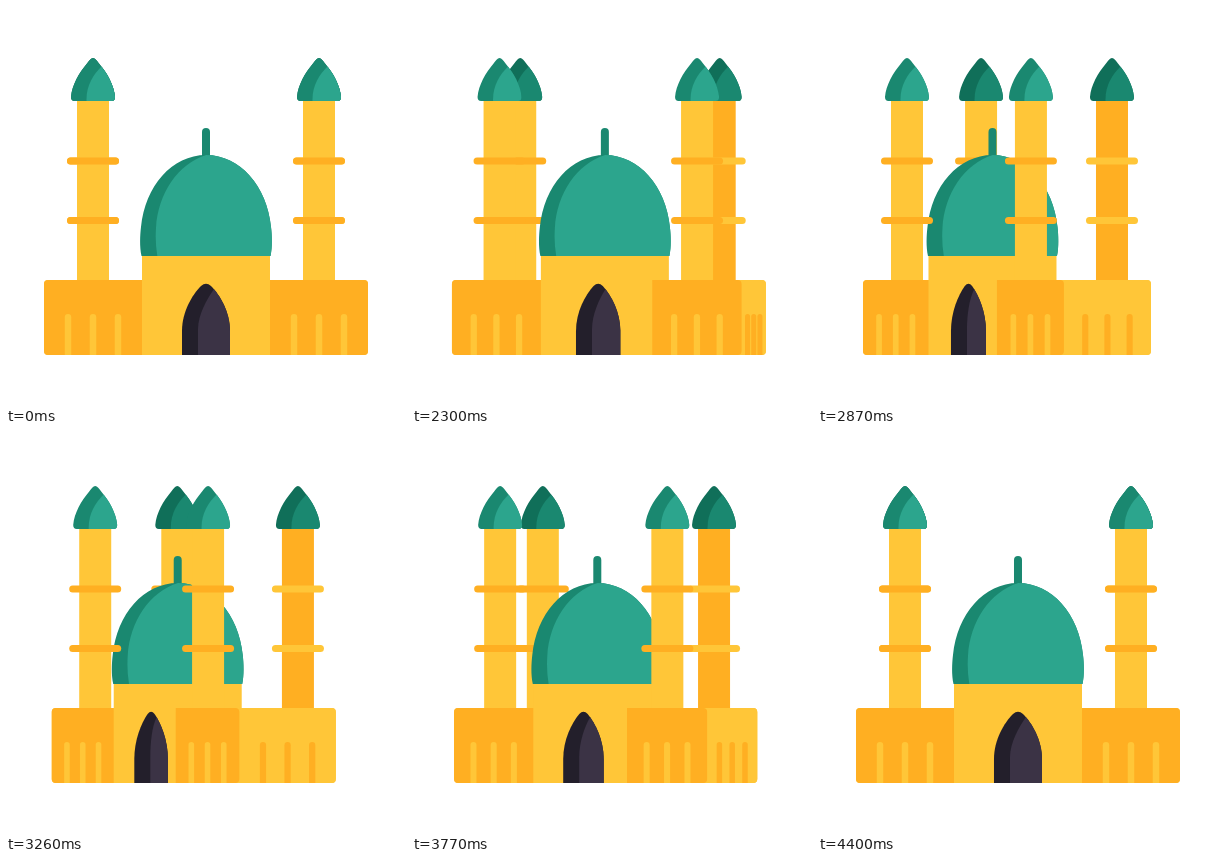
An HTML page that plays this animation: 400x400 px, repeating every 4.43 s.

```html
<!DOCTYPE html>
<html lang="en">
<head>
<meta charset="utf-8">
<title>Turning mosque</title>
<style>
  html, body { margin: 0; width: 100%; height: 100%; overflow: hidden; background: #fff; }
  svg { display: block; width: 100%; height: 100%; }
  .gold { fill: #ffc638; }
  .amber { fill: #ffaf22; }
  .teal { fill: #2ca58d; }
  .pine { fill: #1a8870; }
  .forest { fill: #106f59; }
</style>
</head>
<body>
<svg viewBox="0 0 400 400">
  <defs>
    <path id="cap" d="M0 52C-2 52-4 55-6 57.5C-14 67-21 79-22 91Q-22 95-18.500 95H18.500Q22 95 22 91C21 79 14 67 6 57.500C4 55 2 52 0 52Z"/>
    <path id="capLight" d="M8.500 60.500C0 69-7 80-6.500 95H24V60.500Z"/>
    <path id="dome" d="M135.500 250C133.500 241 134 229 135 221C139 180 166 149 200 149S261 180 265 221C266 229 266.500 241 264.500 250Z"/>
    <path id="domeLight" d="M204 148C174 155 152 186 150 222Q149 237 151.500 251H270V148Z"/>
    <clipPath id="capClip"><use href="#cap"/></clipPath>
    <clipPath id="domeClip"><use href="#dome"/></clipPath>
    <clipPath id="doorClip"><path id="doorShape"/></clipPath>
  </defs>
  <g id="scene"></g>
</svg>
<script>
const NS = 'http://www.w3.org/2000/svg';
const LOOP = 4430;
const scene = document.getElementById('scene');
const doorShape = document.getElementById('doorShape');

// time, turn, speed per second
const KEYS = [
  [2000, 0, 0.02],
  [2510, 0.60, 1.4],
  [2870, 1.00, 0.75],
  [3200, 1.11, 0],
  [3590, 0.92, -1.45],
  [3920, 0.30, -1.45],
  [4160, 0.09, -0.5],
  [4410, 0, 0]
];

function set(node, attrs) {
  for (const k in attrs) node.setAttribute(k, attrs[k]);
  return node;
}

function add(parent, tag, attrs = {}) {
  return parent.appendChild(set(document.createElementNS(NS, tag), attrs));
}

function tower(x, shift, body, ring, dark, light) {
  const g = add(scene, 'g');
  add(g, 'rect', { x: -16, y: 94, width: 32, height: 182, class: body });
  for (const y of [151.5, 211])
    add(g, 'rect', { x: -26, y, width: 52, height: 7, rx: 3.5, class: ring });
  add(g, 'use', { href: '#cap', class: dark });
  add(g, 'use', { href: '#capLight', class: light, 'clip-path': 'url(#capClip)' });
  return q => set(g, { transform: `translate(${x + shift * q} 0)` });
}

function dome() {
  const g = add(scene, 'g');
  add(g, 'rect', { x: 196, y: 122, width: 8, height: 34, rx: 4, class: 'pine' });
  add(g, 'use', { href: '#dome', class: 'pine' });
  add(g, 'use', { href: '#domeLight', class: 'teal', 'clip-path': 'url(#domeClip)' });
  add(g, 'rect', { x: 136, y: 250, width: 128, height: 30, class: 'gold' });
  return q => set(g, { transform: `translate(${-25.5 * q} 0)` });
}

// Wall between l and r with optional rounded top and bottom corners on each side
function wallPath(l, r, a, b) {
  return `M${l + a} 274H${r - b}Q${r} 274 ${r} ${274 + b}V${349 - b}Q${r} 349 ${r - b} 349` +
    `H${l + a}Q${l} 349 ${l} ${349 - a}V${274 + a}Q${l} 274 ${l + a} 274Z`;
}

function wall(left, right, a, b, fill, bar, barWidth) {
  const face = add(scene, 'path', { class: fill });
  const bars = bar ? [0.245, 0.5, 0.755].map(k => [k, add(scene, 'path', { class: bar })]) : [];
  return q => {
    const l = left(q), r = right(q), w = Math.max(0, r - l);
    set(face, { d: wallPath(l, r, Math.min(a, w / 2), Math.min(b, w / 2)) });
    for (const [k, node] of bars) {
      const h = Math.min(barWidth(q), w * 0.3) / 2;
      const x = l + w * k;
      set(node, { d: `M${x - h} 349V${308 + h}A${h} ${h} 0 0 1 ${x + h} ${308 + h}V349Z` });
    }
  };
}

function door() {
  const dark = add(scene, 'path', { fill: '#231f2b' });
  const light = add(scene, 'path', { fill: '#3b3345', 'clip-path': 'url(#doorClip)' });
  return q => {
    const l = 176 - 43 * q, r = 224 - 56 * q;
    const m = (l + r) / 2, s = (r - l) / 48, i = l + 16;
    const d = `M${l} 349V325C${l} 306 ${m - 14 * s} 289 ${m - 5 * s} 280` +
      `Q${m} 275.500 ${m + 5 * s} 280C${m + 14 * s} 289 ${r} 306 ${r} 325V349Z`;
    set(dark, { d });
    set(doorShape, { d });
    set(light, { d: `M${i} 349V323C${i} 309 ${m + s} 293 ${m + 8 * s} 283H${r + 2}V349Z` });
  };
}

const lin = (a, b) => q => a + b * q;
const frontLeft = lin(38, 7), frontRight = lin(362, -116), sideRight = lin(362, -29);
const frontBar = lin(6.5, -0.8), sideBar = lin(4.6, 1.5);

// Back to front
const parts = [
  tower(87, 76, 'gold', 'amber', 'forest', 'pine'),
  tower(313, -19, 'amber', 'gold', 'forest', 'pine'),
  dome(),
  tower(87, 2, 'gold', 'amber', 'pine', 'teal'),
  tower(313, -100, 'gold', 'amber', 'pine', 'teal'),
  wall(frontLeft, sideRight, 4, 4, 'gold'),
  wall(frontRight, sideRight, 0, 4, 'gold', 'amber', sideBar),
  wall(frontLeft, lin(136, -25.5), 4, 0, 'amber', 'gold', frontBar),
  wall(lin(264, -85), frontRight, 0, 4, 'amber', 'gold', frontBar),
  door()
];

function turnAt(t) {
  const n = KEYS.findIndex(k => t < k[0]);
  if (n < 1) return 0;
  const [t0, p0, v0] = KEYS[n - 1], [t1, p1, v1] = KEYS[n];
  const d = t1 - t0, u = (t - t0) / d, w = 1 - u;
  return w * w * (1 + 2 * u) * p0 + u * u * (3 - 2 * u) * p1 +
    u * w * (w * v0 - u * v1) * d / 1000;
}

function draw(t) {
  const q = turnAt(t);
  for (const place of parts) place(q);
}

const start = performance.now();
function tick() {
  draw((performance.now() - start) % LOOP);
  requestAnimationFrame(tick);
}
draw(0);
requestAnimationFrame(tick);
</script>
</body>
</html>
```
